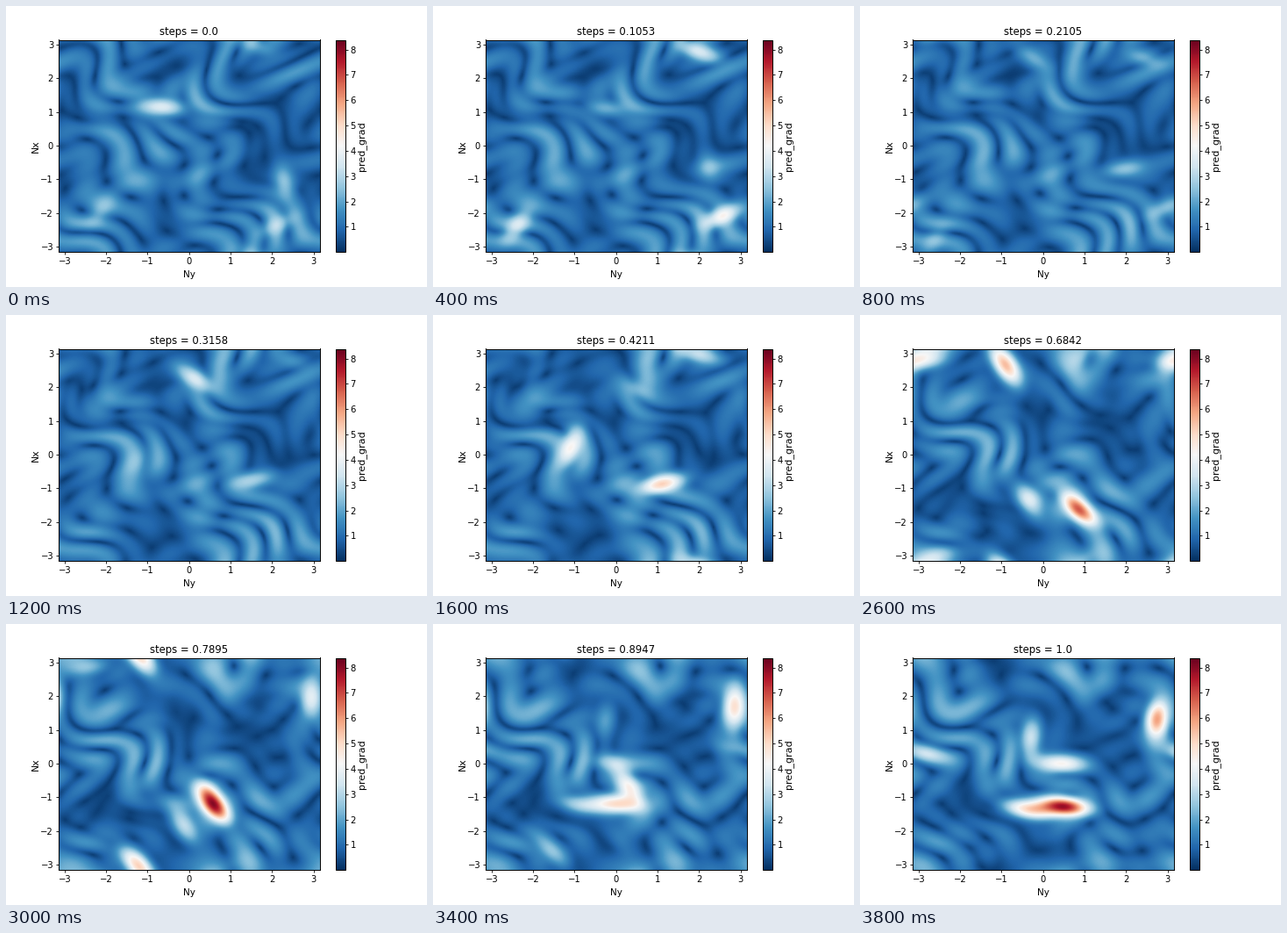
Write a matplotlib script that moves like this. It is 480 by 320 pixels and loops after 4000 ms.

```python
import numpy as np
import matplotlib.pyplot as plt
from matplotlib.animation import FuncAnimation

W, H, STEPS = 480, 320, 20
VMIN, VMAX = 0.02, 8.385
PI = np.pi
SPEED, LIFE = 0.25, 1.9      # ridge drift per step, spread of its life in steps
LENGTH, WIDTH = 0.46, 0.21   # ridge half axes

plt.rcParams.update({
    "font.family": "DejaVu Sans",
    "font.size": 7.2,
    "axes.linewidth": 0.7,
    "xtick.major.width": 0.6, "ytick.major.width": 0.6,
    "xtick.major.size": 2.4, "ytick.major.size": 2.4,
    "xtick.major.pad": 2.2, "ytick.major.pad": 1.9,
})

# Bright ridges: step of the peak, x, y, heading in degrees, height
RIDGES = [
    (0, -.7, 1.15, -5, 3.6), (0, 2.3, -1.1, 100, 2.4),
    (2, 2.0, 2.8, -25, 3.4), (2, -2.4, -2.4, 240, 3.1),
    (2, 2.55, -2.1, 32, 4.0), (4, 1.95, -.7, 190, 2.2),
    (6, .15, 2.25, -42, 3.4), (8.5, -1.05, .35, 75, 4.4),
    (8.5, 1.85, 3.05, 160, 3.2), (9, .85, -.95, 197, 5.4),
    (12, -2.4, -2.95, 195, 3.0), (12, .8, 2.75, 60, 2.4),
    (13, -.9, 2.6, 118, 4.8), (13, -2.95, 2.8, 8, 3.6),
    (13, 1.0, -1.75, 140, 3.2), (14, -.23, -1.6, -65, 3.5),
    (15, .55, -1.1, 120, 6.8), (15.5, -1.4, -2.8, 130, 3.0),
    (15.5, 2.95, 1.8, 265, 3.2), (19, 2.75, 1.35, 263, 5.5),
    (19, .5, -1.27, -8, 7.5), (19, -.4, -1.37, -15, 4.4),
    (19, .45, 0, -5, 4.0), (19, -.3, .8, 265, 3.2),
    (19, -2.85, .3, -15, 3.0),
]

axis = np.linspace(-PI, PI, 160)
X, Y = np.meshgrid(axis, axis)
rng = np.random.default_rng(11)


def make_waves(count, top):
    """Periodic modes: wave numbers, phase, turning rate."""
    waves = []
    while len(waves) < count:
        kx, ky = rng.integers(-top, top + 1, 2)
        if kx or ky:
            waves.append((kx, ky, rng.uniform(0, 2 * PI), rng.normal(0, .12)))
    return waves


FLOW, SWIRL = make_waves(18, 4), make_waves(6, 2)


def gradient(waves, step, x, y):
    """Gradient of a sum of drifting waves."""
    gx = gy = 0
    for kx, ky, phase, rate in waves:
        s = np.sin(kx * x + ky * y + phase + rate * step) / np.hypot(kx, ky)
        gx, gy = gx + kx * s, gy + ky * s
    return gx, gy


def wrap(d):
    return (d + PI) % (2 * PI) - PI


def ridge(step, peak, x, y, heading, height):
    """Elongated bump that slides along its own axis, swells and fades."""
    age = step - peak
    c, s = np.cos(np.radians(heading)), np.sin(np.radians(heading))
    dx = wrap(X - x - SPEED * age * c)
    dy = wrap(Y - y - SPEED * age * s)
    u, v = (c * dx + s * dy) / LENGTH, (c * dy - s * dx) / WIDTH
    return height * np.exp(-(u * u + v * v + (age / LIFE) ** 2) / 2)


def field(step):
    wx, wy = gradient(SWIRL, step, X, Y)
    haze = np.hypot(*gradient(FLOW, step, X - .15 * wy, Y + .15 * wx))
    haze = 0.2 + 0.85 * haze / haze.mean()
    bright = sum(ridge(step, *r) for r in RIDGES)
    return np.clip(np.hypot(haze, bright), VMIN, VMAX)


def box(x0, y0, x1, y1):
    """Axes rectangle from pixel corners measured from the top left."""
    return [x0 / W, 1 - y1 / H, (x1 - x0) / W, (y1 - y0) / H]


fig = plt.figure(figsize=(W / 100, H / 100), dpi=100, facecolor="white")
ax = fig.add_axes(box(60, 38.5, 357.5, 279.7))
cax = fig.add_axes(box(376, 38.5, 386.5, 279.7))

im = ax.imshow(field(0), origin="lower", extent=(-PI, PI, -PI, PI),
               aspect="auto", cmap="RdBu_r", vmin=VMIN, vmax=VMAX,
               interpolation="bilinear")
ax.set_xticks(range(-3, 4))
ax.set_yticks(range(-3, 4))
bar = fig.colorbar(im, cax=cax, ticks=range(1, 9))
bar.outline.set_linewidth(0.7)


def label(x, y, text, size, **kw):
    return fig.text(x / W, 1 - y / H, text, size=size, ha="center", **kw)


title = label(208.75, 33.3, "", 8.4, va="baseline")
label(208.75, 306, "Ny", 7.5, va="center")
label(34, 160, "Nx", 7.8, va="center", rotation=90)
label(406, 160, "pred_grad", 8, va="center", rotation=90)


def update(step):
    im.set_data(field(step))
    title.set_text(f"steps = {round(step / (STEPS - 1), 4)}")
    return im, title


anim = FuncAnimation(fig, update, frames=STEPS, interval=200,
                     repeat=True, repeat_delay=0, blit=False)
plt.show()
```
